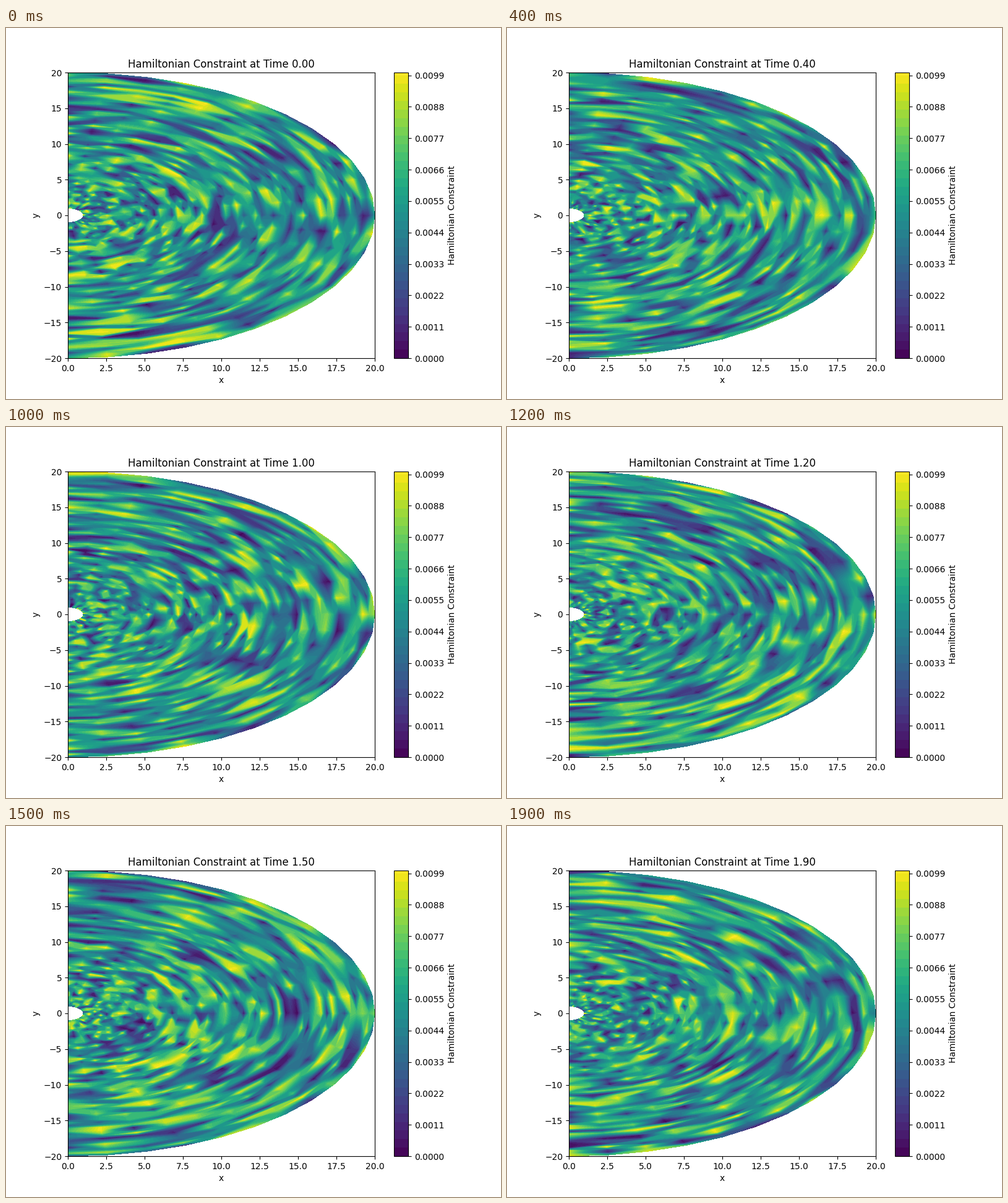
A matplotlib script for the animation above (2000 ms loop, 800 by 600 pixels).

```python
import matplotlib.pyplot as plt
import numpy as np
from matplotlib.animation import FuncAnimation
from matplotlib.colors import ListedColormap

FRAMES, INTERVAL = 20, 100
PEAK = 0.01
NAME = "Hamiltonian Constraint"

# Half-disc polar mesh, angle measured from the y axis
r, theta = np.meshgrid(np.linspace(1, 20, 50), np.linspace(0, np.pi, 25),
                       indexing="ij")
x, y = r * np.sin(theta), r * np.cos(theta)

# Independent uniform noise at every time step
np.random.seed(42)
noise = PEAK * np.random.rand(FRAMES, *r.shape)

# Fine contour levels, coloured in runs of three
levels = np.linspace(0, PEAK, 101)
shade = (np.arange(100) // 3 * 3 + 1.5) / 100
cmap = ListedColormap(plt.get_cmap("viridis")(shade))

fig, ax = plt.subplots(figsize=(8, 6), dpi=100)
ax.set(xlabel="x", ylabel="y")


def fill(i):
    return ax.contourf(x, y, noise[i], levels=levels, cmap=cmap)


field = fill(0)
fig.colorbar(field, ax=ax, label=NAME)
ax.set(xlim=(0, 20), ylim=(-20, 20))


def update(i):
    global field
    field.remove()
    field = fill(i)
    title = ax.set_title(f"{NAME} at Time {i * INTERVAL / 1000:.2f}")
    return field, title


anim = FuncAnimation(fig, update, frames=FRAMES, interval=INTERVAL,
                     repeat=True, repeat_delay=0, blit=False)
plt.show()
```
